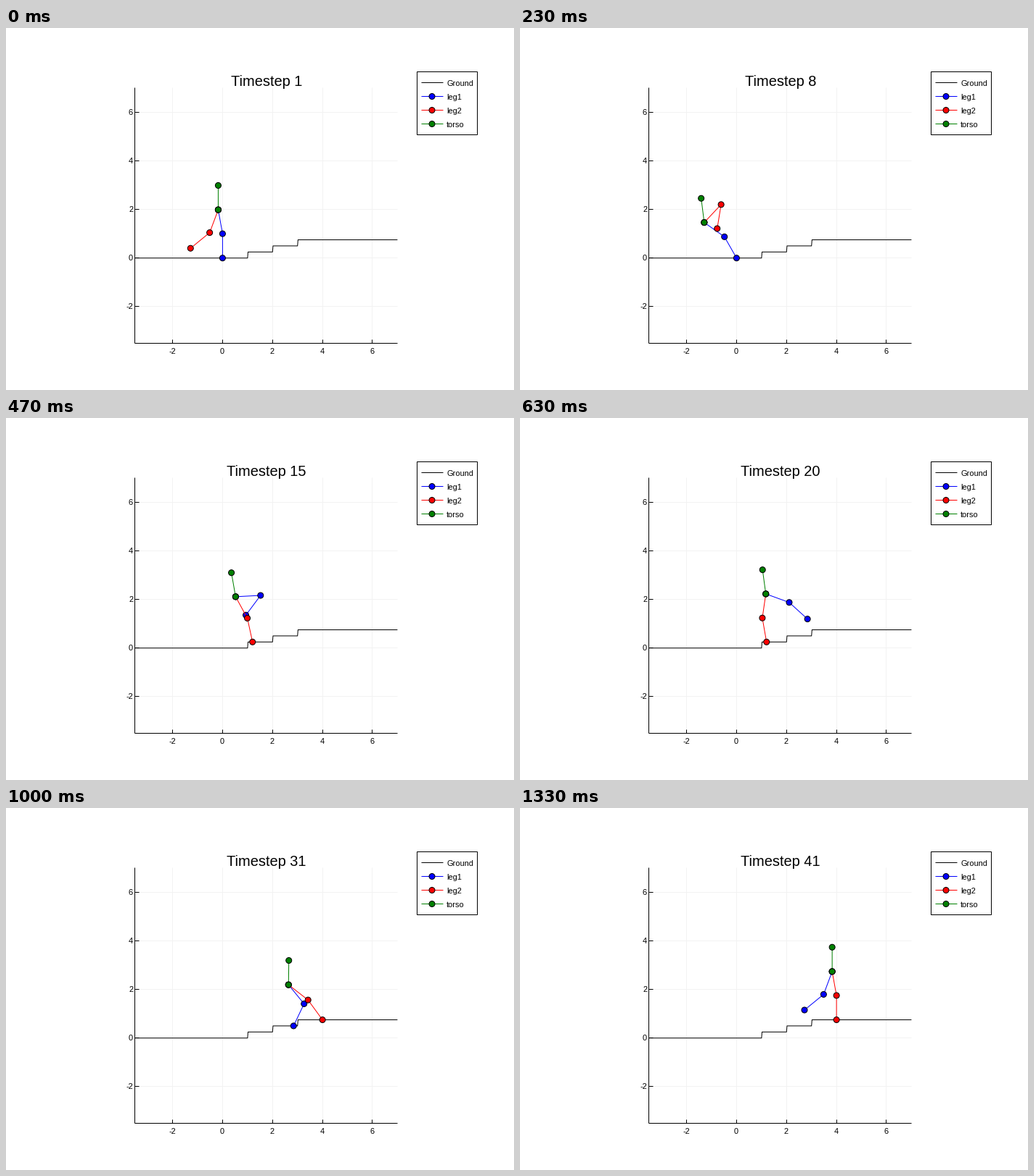
Animation, 700 px wide and 500 px high, one loop 1.36 s. Source, as a matplotlib script:

```python
import numpy as np
import matplotlib.pyplot as plt
from matplotlib.animation import FuncAnimation
from matplotlib.patches import Circle, Rectangle

W, H, DPI = 700, 500, 100
PX = 72 / DPI  # points per pixel
STEPS, STRIDE = 41, 10
FRAMES, INTERVAL = 136, 10

plt.rcParams["font.family"] = "Liberation Sans"


def px(x):
    return 298.4 + 34.43 * np.asarray(x)


def py(y):
    return 317.75 - 33.6 * np.asarray(y)


def ground(x):
    return min(int(x), 3) / 4


# Every link has length 1. Angles in degrees, forward is positive:
# torso from vertical, thigh and shank of the stance and swing leg from down.
REST = (0, 10, 0, -20, -50)
POSES = {
    1: REST,
    8: (-7, 54, 29, 137.5, -9),
    15: (-9.7, 28, 12, 93, -36),
    20: (-7.5, -8, 9.7, 69.5, 47),
    26: (-4.4, 27.6, 15.7, 83, -14.6),
    36: (5.8, 24.6, 34.3, 80, -85),
    41: REST,
}
FOOTHOLDS = [np.array([x, ground(x)]) for x in (0, 1.2, 2.842, 4)]
LANDING_HIP = np.array([-1.36, 1.44])  # relative to the landed foot


def stride(step):
    return min((step - 1) // STRIDE, len(FOOTHOLDS) - 1)


def by_leg(stance, swing, n):
    """Angles in leg order; the legs swap roles with every stride."""
    return (*swing, *stance) if n % 2 else (*stance, *swing)


def link(deg):
    a = np.radians(deg)
    return np.array([np.sin(a), -np.cos(a)])


def reach(hip, foot):
    """Thigh and shank angles that put the foot in place, knee forward."""
    dx, dy = foot - hip
    aim = np.degrees(np.arctan2(dx, -dy))
    bend = np.degrees(np.arccos(np.hypot(dx, dy) / 2))
    return aim + bend, aim - bend


def leg_keys():
    keys = {s: by_leg(p[1:3], p[3:], stride(s)) for s, p in POSES.items()}
    for n in range(1, len(FOOTHOLDS)):
        old, new = FOOTHOLDS[n - 1], FOOTHOLDS[n]
        hip = new + LANDING_HIP
        keys[1 + STRIDE * n] = by_leg(reach(hip, new), reach(hip, old), n)
    return sorted(keys.items())


KEY_STEPS, KEY_ANGLES = zip(*leg_keys())


def walker(step):
    """Joint positions of both legs and the torso."""
    angles = [np.interp(step, KEY_STEPS, a) for a in zip(*KEY_ANGLES)]
    legs = angles[:2], angles[2:]
    lean = np.interp(step, list(POSES), [p[0] for p in POSES.values()])
    n = stride(step)
    hip = FOOTHOLDS[n] - sum(link(a) for a in legs[n % 2])
    parts = []
    for thigh, shank in legs:
        knee = hip + link(thigh)
        parts.append(np.array([hip, knee, knee + link(shank)]))
    parts.append(np.array([hip, hip - link(-lean)]))
    return parts


fig = plt.figure(figsize=(W / DPI, H / DPI), dpi=DPI, facecolor="white")
ax = fig.add_axes([0, 0, 1, 1])
ax.set_xlim(0, W)
ax.set_ylim(H, 0)
ax.axis("off")


def line(x, y, color="black", **kw):
    return ax.plot(x, y, color=color, lw=PX, solid_capstyle="butt", **kw)[0]


def rule(x0, y0, x1, y1, color="black"):
    """Straight line on whole pixels; the shift makes snapping round down."""
    line(np.array([x0, x1]) - 0.5, np.array([y0, y1]) - 0.5, color)


def label(x, y, s, size=11, ha="center"):
    return ax.text(x, y, s, fontsize=size * PX, ha=ha, va="baseline")


def joint(x, y, color, z=3):
    return ax.add_patch(Circle((x, y), 4, fc=color, ec="black", lw=PX, zorder=z))


left, right, top, bottom = px(-3.5), px(7), py(7), py(-3.5)

# Grid, ticks and axis lines
for v in range(-2, 7, 2):
    rule(px(v), top, px(v), bottom, "#f2f2f2")
    rule(left, py(v), right, py(v), "#f2f2f2")
for v in range(-2, 7, 2):
    rule(px(v), bottom, px(v), bottom - 5.3)
    rule(left, py(v), left + 5.3, py(v))
    label(px(v) - 0.5, 450, str(v))
    label(175, py(v) + 3.5, str(v), ha="right")
rule(left, top, left, bottom)
rule(left, bottom, right, bottom)

# Stairs with slightly slanted risers
stairs = [(-3.5, 0)]
for n in (1, 2, 3):
    stairs += [(n, ground(n - 1)), (n + 0.02, ground(n))]
gx, gy = zip(*stairs, (7, ground(7)))
line(px(gx), py(gy), snap=False)

# Legend
ax.add_patch(Rectangle((566, 60), 83, 87, fc="white", ec="black", lw=PX))
PARTS = {"leg1": "blue", "leg2": "red", "torso": "green"}
for i, (name, color) in enumerate({"Ground": "black", **PARTS}.items()):
    y = 75.5 + 19 * i
    rule(572, y, 602, y, color)
    if name in PARTS:
        joint(587, y, color)
    label(607, y + 4.3, name, ha="left")

title = label(358.9, 80, "", 20)
limbs = []
for z, (color, count) in enumerate(zip(PARTS.values(), (3, 3, 2)), start=4):
    bone = line([], [], color, snap=False, zorder=z)
    limbs.append((bone, [joint(0, 0, color, z + 0.5) for _ in range(count)]))


def update(i):
    # Thirty steps a second, each start rounded to 10 ms
    step = min((6 * i + 3) // 20, STEPS - 1) + 1
    title.set_text(f"Timestep {step}")
    for (bone, dots), pts in zip(limbs, walker(step)):
        x, y = px(pts[:, 0]), py(pts[:, 1])
        bone.set_data(x, y)
        for dot, center in zip(dots, zip(x, y)):
            dot.center = center


anim = FuncAnimation(fig, update, frames=FRAMES, interval=INTERVAL,
                     repeat=True, repeat_delay=0, blit=False)
plt.show()
```
